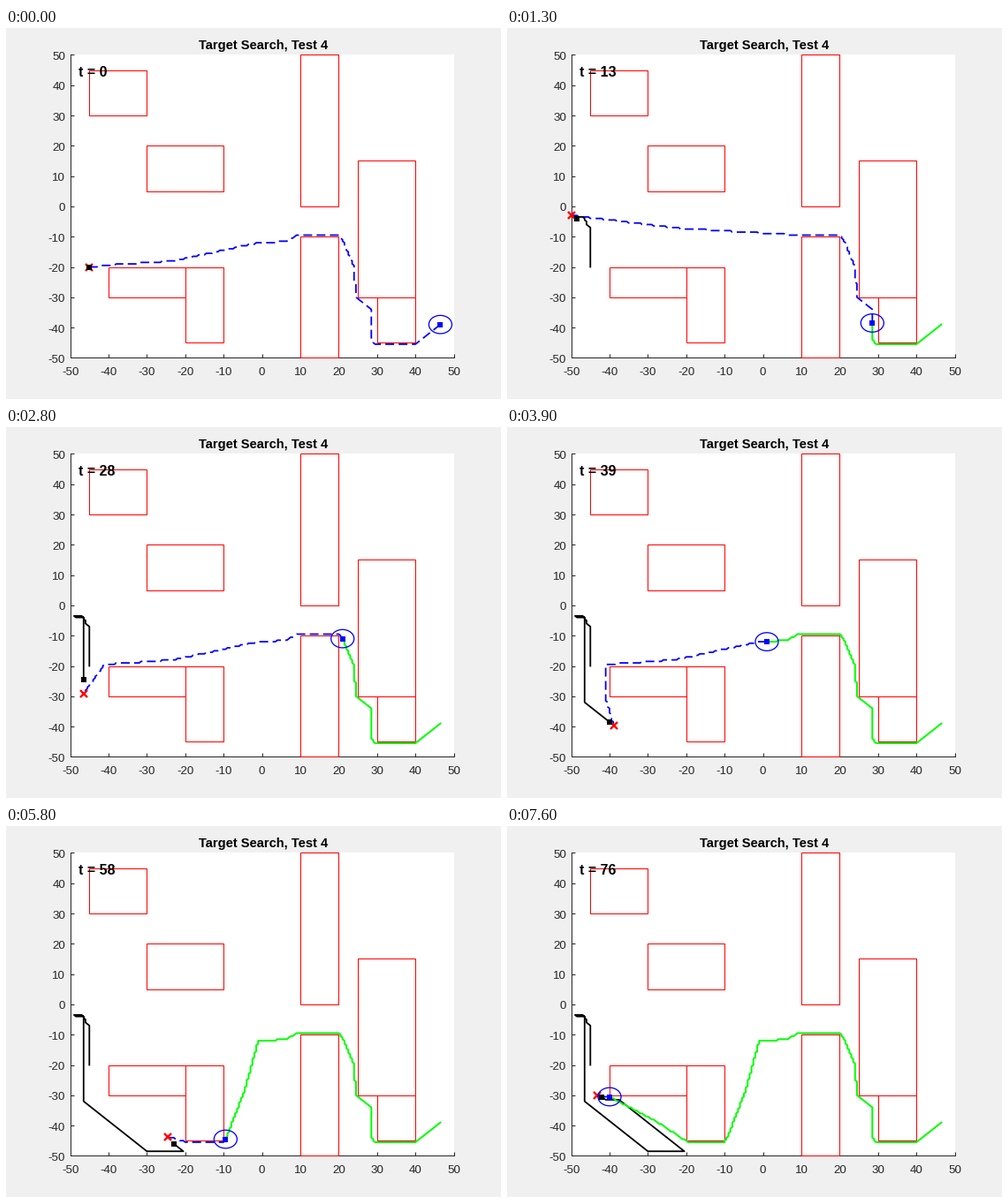
A matplotlib script for the animation above (8000 ms loop, 560 by 420 pixels).

```python
import numpy as np
import matplotlib.pyplot as plt
from matplotlib.animation import FuncAnimation
from matplotlib.patches import Circle, Rectangle

W, H, DPI = 560, 420, 100
PX = 72 / DPI  # points per pixel
LAST, FRAMES = 76, 80
GREY = "#262626"

plt.rcParams["font.family"] = "Liberation Sans"

# Obstacles: x, y, width, height
WALLS = [(-45, 30, 15, 15), (-30, 5, 20, 15), (10, 0, 10, 50), (10, -50, 10, 40),
         (25, -30, 15, 45), (30, -45, 10, 15), (-40, -30, 20, 10), (-20, -45, 10, 25)]

# Turning points; each key is the time at the first point of its leg
SEEKER = {
    0: [(46.5, -39), (40, -45.5), (29.5, -45.5), (28.5, -44)],
    13: [(28.5, -38.5), (28.5, -34), (24.5, -30), (24, -20)],
    28: [(21, -11), (20, -9.5), (9, -9.5), (6.5, -11.5)],
    39: [(1, -12), (-1, -12)],
    49: [(-4.5, -28.5)],
    58: [(-9.5, -44.5), (-10, -45.5), (-19.5, -45.5), (-28, -38.5)],
    LAST: [(-40, -30.5)],
}
TARGET = {
    0: [(-45, -20), (-45, -7), (-46, -6), (-46, -5), (-47, -3.5), (-49, -3.5)],
    13: [(-48.5, -4), (-46.5, -4), (-46.5, -32)],
    39: [(-40, -38.5)],
    49: [(-30, -48.5), (-20.5, -48.5)],
    58: [(-23, -46), (-37.5, -31.5), (-41, -31.5)],
    LAST: [(-42, -30.5)],
}


def stairs(points):
    """Walk through the points on a half-unit grid."""
    points = np.array(points, float)
    out = [points[:1]]
    for a, b in zip(points, points[1:]):
        n = max(1, int(2 * np.abs(b - a).max()))
        out.append(np.linspace(a, b, n + 1)[1:])
    return np.round(2 * np.vstack(out)) / 2


class Track:
    """Grid walk with even speed between its timed points."""

    def __init__(self, legs):
        keys = sorted(legs)
        times, parts = [], []
        for a, b in zip(keys, keys[1:]):
            pts = stairs(legs[a] + legs[b][:1])
            arc = np.r_[0, np.cumsum(np.hypot(*np.diff(pts, axis=0).T))]
            times.extend(a + (b - a) * arc[:-1] / arc[-1])
            parts.append(pts[:-1])
        self.t = np.array(times + [keys[-1]])
        self.p = np.vstack(parts + [legs[keys[-1]]])

    def at(self, t):
        return np.array([np.interp(t, self.t, c) for c in self.p.T])

    def trail(self, t):
        return np.vstack([self.p[self.t < t], self.at(t)])

    def between(self, a, b):
        return self.p[(self.t > a) & (self.t <= b)]

    def when(self, x, y):
        return self.t[np.hypot(*(self.p - (x, y)).T).argmin()]


seeker, target = Track(SEEKER), Track(TARGET)
T_GAP = seeker.when(9, -9.5)
T_FORK = seeker.when(-1, -12)
T_CORNER = seeker.when(-10, -45.5)
T_BEND = seeker.when(-19.5, -45.5)


def estimate(t):
    """Extrapolate the target's recent motion by a wavering lead."""
    now = target.at(t)
    speed = (now - target.at(t - 3)) / 3
    lead = 2 + np.cos(2 * np.pi * (t - 28) / 7.33)
    return np.clip(now + lead * speed, -50, 50)


def plan(t, goal):
    x, y = goal
    via = []
    if t > T_FORK:
        stop = T_CORNER if y < -45.5 else T_BEND
    elif y > -15:
        stop = T_GAP
        via = [(-22, -9.5 + 0.35 * (y + 9.5))]
    else:
        stop = T_FORK
        via = [(-23, -18), (-41, -19.5)]
        if x > -41 and y < -30:
            via += [(-41, -30.5)]
    near = np.vstack([seeker.at(t), seeker.between(t, stop)])
    return np.vstack([near, stairs([near[-1], *via, goal])[1:-1], goal])


fig = plt.figure(figsize=(W / DPI, H / DPI), dpi=DPI, facecolor="#f0f0f0")
ax = fig.add_axes([72.6 / W, 46.6 / H, 434 / W, 343 / H])
ticks = range(-50, 51, 10)
ax.set(xlim=(-50, 50), ylim=(-50, 50), xticks=ticks, yticks=ticks)
ax.spines[["top", "right"]].set_visible(False)
ax.spines[["left", "bottom"]].set(color=GREY, linewidth=PX)
ax.tick_params(direction="in", length=4 * PX, width=PX, color=GREY,
               labelbottom=False, labelleft=False)


def tick_label(value, xy, dx, dy, ha):
    ax.annotate(str(value), xy, (dx * PX, dy * PX), textcoords="offset points",
                ha=ha, va="baseline", color=GREY, size=13.33 * PX)


for v in ticks:
    tick_label(v, (v, -50), 0, -19.4, "center")
    tick_label(v, (-50, v), -5.5, -5.5, "right")

fig.text(290.8 / W, 1 - 24 / H, "Target Search, Test 4", ha="center",
         va="baseline", weight="bold", size=14.67 * PX)

for x, y, w, h in WALLS:
    ax.add_patch(Rectangle((x, y), w, h, fill=False, ec="red", lw=PX,
                           clip_on=False, zorder=3))


def line(color, width, z, **kw):
    return ax.plot([], [], color=color, lw=width * PX, zorder=z,
                   clip_on=False, **kw)[0]


def mark(shape, color, size, z, edge=0):
    return ax.plot([], [], shape, color=color, ms=size * PX, mew=edge * PX,
                   zorder=z, clip_on=False)[0]


route = line("blue", 1.8, 4, dashes=(10 / 1.8, 5 / 1.8), dash_capstyle="butt")
walked = line("black", 1.8, 4.2)
searched = line("lime", 2, 4.4)
guess = mark("x", "red", 8, 5, 2.4)
prey = mark("s", "black", 6, 5.2)
hunter = mark("s", "blue", 6, 5.2)
view = ax.add_patch(Circle((0, 0), 3, fill=False, ec="blue", lw=1.3 * PX,
                           zorder=5, clip_on=False))
clock = ax.text(-47.8, 42.75, "", weight="bold", size=16 * PX, va="baseline",
                zorder=6)


def draw(i):
    t = min(i, LAST)
    goal = estimate(t)
    here, there = seeker.at(t), target.at(t)
    route.set_data(*plan(t, goal).T)
    walked.set_data(*target.trail(t).T)
    searched.set_data(*seeker.trail(t).T)
    for m, p in ((guess, goal), (prey, there), (hunter, here)):
        m.set_data([p[0]], [p[1]])
    view.center = tuple(here)
    clock.set_text(f"t = {t}")
    return route, walked, searched, guess, prey, hunter, view, clock


anim = FuncAnimation(fig, draw, frames=FRAMES, interval=100, repeat=True)
plt.show()
```
